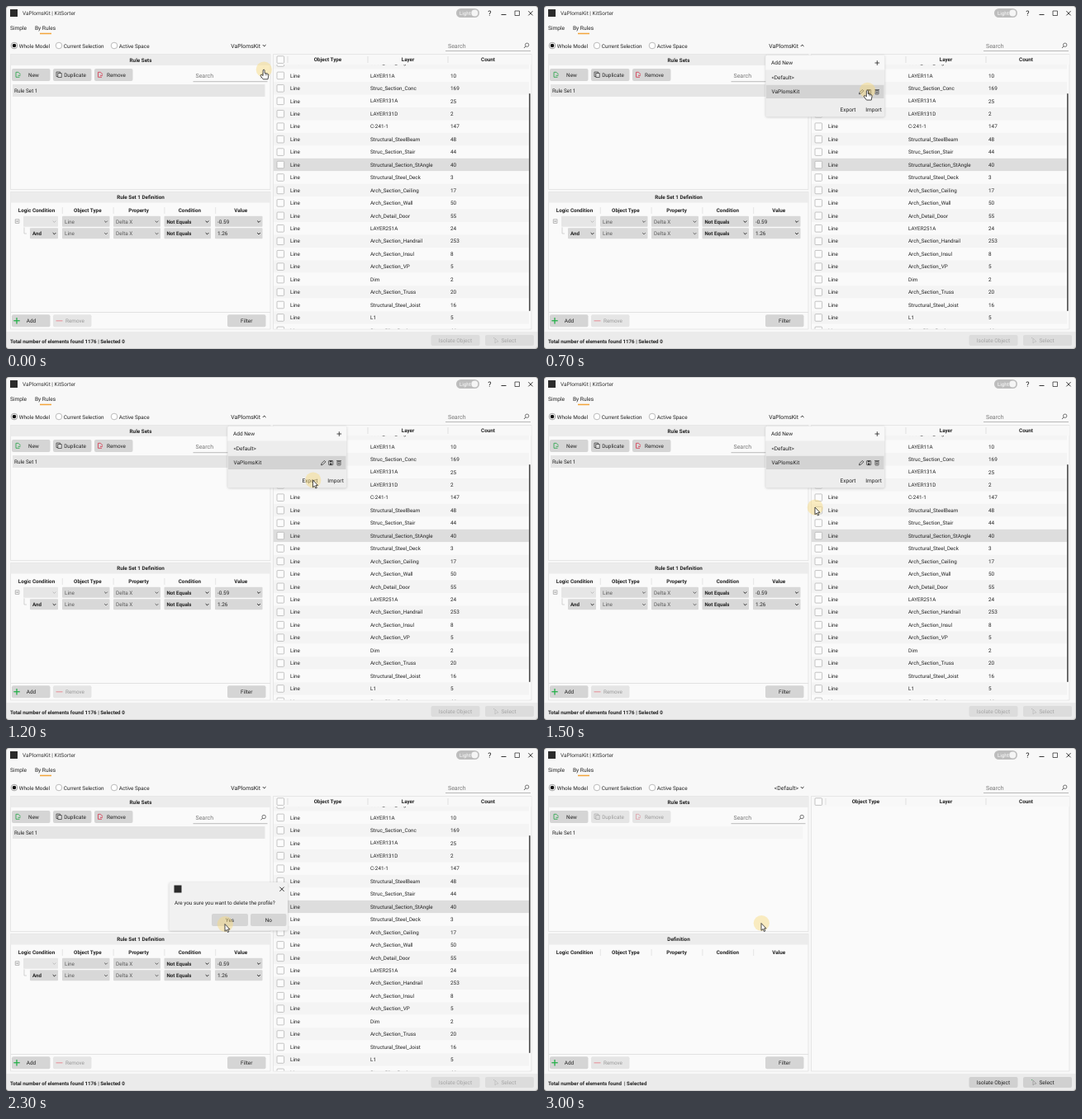
These frames come from a looping animation (644 by 416 pixels, 4.2 s). An HTML page with a canvas:

```html
<!DOCTYPE html>
<html lang="en">
<head>
<meta charset="utf-8">
<title>Rule filter</title>
<style>
html, body { margin: 0; width: 100%; height: 100%; overflow: hidden; background: #f8f8f8; }
canvas { display: block; width: 644px; height: 416px; }
</style>
</head>
<body>
<canvas id="stage"></canvas>
<script>
const W = 644, H = 416, LOOP = 4200, STEP = 100;
const APP = "VaPlomsKit", TOOL = "KitSorter";
const INK = "#222", SOFT = "#5c5c5c", DIM = "#9a9a9a", BTN = "#d5d5d5", BTN_OFF = "#e5e5e5";
const canvas = document.getElementById("stage");
const c = canvas.getContext("2d");
const dpr = window.devicePixelRatio || 1;
canvas.width = W * dpr;
canvas.height = H * dpr;

const layers = [
  ["Struc_Slab_Edge", 12], ["LAYER11A", 10], ["Struc_Section_Conc", 169], ["LAYER131A", 25],
  ["LAYER131D", 2], ["C-241-1", 147], ["Structural_SteelBeam", 48], ["Struc_Section_Stair", 44],
  ["Structural_Section_StAngle", 40], ["Structural_Steel_Deck", 3], ["Arch_Section_Ceiling", 17],
  ["Arch_Section_Wall", 50], ["Arch_Detail_Door", 55], ["LAYER251A", 24],
  ["Arch_Section_Handrail", 253], ["Arch_Section_Insul", 8], ["Arch_Section_VP", 5], ["Dim", 2],
  ["Arch_Section_Truss", 20], ["Structural_Steel_Joist", 16], ["L1", 5], ["Struc_Slim_Deck", 44]
];

// Pointer stops: time, x, y
const path = [
  [0, 312, 77], [200, 311, 49], [300, 311, 49], [400, 345, 73], [500, 382, 102],
  [900, 400.5, 102.5], [1000, 400.5, 103], [1500, 328, 158], [2100, 266, 214],
  [2300, 265, 213.5], [2800, 263, 212.5], [LOOP, 263, 212.5]
];

function pointer(t) {
  let i = 0;
  while (i < path.length - 2 && t >= path[i + 1][0]) i++;
  const [t0, x0, y0] = path[i], [t1, x1, y1] = path[i + 1];
  const k = (t - t0) / (t1 - t0);
  return [x0 + (x1 - x0) * k, y0 + (y1 - y0) * k];
}

function rect(x, y, w, h, fill, r = 0, stroke) {
  c.beginPath();
  c.roundRect(x, y, w, h, r);
  if (fill) { c.fillStyle = fill; c.fill(); }
  if (stroke) { c.strokeStyle = stroke; c.lineWidth = 0.7; c.stroke(); }
}

// y is the visual middle of the text
function text(s, x, y, { size = 6.4, color = INK, bold = false, align = "left" } = {}) {
  c.font = (bold ? "bold " : "") + size + "px Roboto, sans-serif";
  c.fillStyle = color;
  c.textAlign = align;
  c.fillText(s, x, y + size * 0.36);
}

const head = (s, x, y) => text(s, x, y, { size: 6.3, bold: true, align: "center" });

function line(color, width, ...pts) {
  c.beginPath();
  for (let i = 0; i < pts.length; i += 2) c.lineTo(pts[i], pts[i + 1]);
  c.strokeStyle = color;
  c.lineWidth = width;
  c.stroke();
}

function ring(x, y, r, stroke, fill, width = 0.7) {
  c.beginPath();
  c.arc(x, y, r, 0, 7);
  if (fill) { c.fillStyle = fill; c.fill(); }
  if (stroke) { c.strokeStyle = stroke; c.lineWidth = width; c.stroke(); }
}

const chevron = (x, y, up, color = INK) => {
  const d = up ? -0.9 : 0.9;
  line(color, 1, x - 1.8, y - d, x, y + d, x + 1.8, y - d);
};
const cross = (x, y, r) => {
  line(INK, 0.9, x - r, y - r, x + r, y + r);
  line(INK, 0.9, x - r, y + r, x + r, y - r);
};
const plus = (x, y, r, color, w) => {
  line(color, w, x - r, y, x + r, y);
  line(color, w, x, y - r, x, y + r);
};

function button(s, x, y, w, h, on = true, tx = x + w / 2) {
  rect(x, y, w, h, on ? BTN : BTN_OFF, 2);
  text(s, tx, y + h / 2, { align: "center", color: on ? INK : DIM });
}

function search(x, y, x0, x1, base) {
  text("Search", x, y, { size: 7, color: "#777" });
  line("#aaa", 0.8, x0, base, x1, base);
  ring(x1 - 4.3, y - 0.8, 2.2, "#555", null, 0.8);
  line("#555", 0.9, x1 - 5.9, y + 0.8, x1 - 8, y + 3);
}

function docIcon(x, y, color, on) {
  c.globalAlpha = on ? 1 : 0.4;
  line(color, 0.9, x + 2, y + 3, x - 2.5, y + 3, x - 2.5, y - 3, x + 0.5, y - 3, x + 2.5, y - 1, x + 2.5, y);
  line(color, 0.9, x, y + 1, x + 3, y + 1);
  c.globalAlpha = 1;
}

function titleBar(name) {
  rect(5, 4, 9, 9, "#2b2b2b");
  text(APP + " | " + TOOL, 20, 8.7, { size: 6.5, color: "#333" });
  rect(545, 3, 28, 11, "#bdbdbd", 5.5);
  text("Light", 549, 8.6, { size: 6.2, color: "#fff" });
  ring(567.3, 8.5, 4, null, "#f5f5f5");
  text("?", 585.5, 8.7, { size: 9, align: "center" });
  line(INK, 0.9, 599.5, 10.5, 605.5, 10.5);
  rect(616, 6, 5.5, 5.5, null, 0, INK);
  cross(635, 8.8, 2.6);
  text("Simple", 5, 26.5, { size: 6.6 });
  text("By Rules", 35, 26.5, { size: 6.6 });
  rect(41, 32.7, 14, 1.5, "#f2a43a");
  [["Whole Model", 10], ["Current Selection", 64], ["Active Space", 131]].forEach(([s, x], i) => {
    ring(x, 48, 3.8, i ? "#a0a0a0" : "#777", "#fff");
    if (!i) ring(x, 48, 2.3, null, "#111");
    text(s, x + 5.8, 48.2);
  });
  text(name, 308, 48.2, { size: 6.9, align: "right" });
  search(535, 48, 532, 635, 54.5);
}

function combo(s, x, y, w, color = INK, bold = false) {
  rect(x, y, w, 13, "#d8d8d8", 1);
  text(s, x + 3, y + 6.5, { color, bold, size: bold ? 6.2 : 6.4 });
  chevron(x + w - 4.5, y + 6.7, false, color);
}

function ruleSets(empty) {
  rect(5.5, 58.5, 314.5, 164, "#fafafa", 0, "#dedede");
  rect(5.5, 58.5, 314.5, 13.5, "#ececec");
  head("Rule Sets", 163, 65.4);
  button("New", 7, 76, 46.5, 15, true, 33.5);
  button("Duplicate", 57, 76, 46.5, 15, !empty, 83.5);
  button("Remove", 107, 76, 46.5, 15, !empty, 133.5);
  docIcon(14.5, 83.3, "#35a853", true);
  const tone = empty ? "#aaa" : "#333";
  rect(61, 80, 4.5, 5.5, null, 0, tone);
  rect(62.8, 81.5, 4.5, 5, "#ddd", 0, tone);
  docIcon(114, 83.3, "#d6455b", !empty);
  search(229.5, 84.3, 226.5, 316.5, 91.7);
  rect(8, 95, 305.5, 15, empty ? "#f5f5f5" : "#e5e5e5");
  text("Rule Set 1", 10, 102.4);
}

function definition(empty) {
  rect(5.5, 225.5, 314.5, 166.5, "#fafafa", 0, "#dedede");
  rect(5.5, 225.5, 314.5, 13, "#ececec");
  head(empty ? "Definition" : "Rule Set 1 Definition", 163, 232);
  ["Logic Condition", "Object Type", "Property", "Condition", "Value"].forEach((s, i) => {
    head(s, 37 + i * 61.8, 248);
    if (i) line("#e0e0e0", 0.8, 6.5 + i * 61.8, 244, 6.5 + i * 61.8, 252);
  });
  if (!empty) {
    rect(21, 254.8, 42, 13, "#e6e6e6", 1);
    chevron(58.5, 261.5, false, "#bbb");
    combo("And", 29, 269.3, 34, INK, true);
    ["-0.59", "1.26"].forEach((v, i) => {
      const y = 254.8 + i * 14.5;
      combo("Line", 68, y, 57.5, SOFT);
      combo("Delta X", 130, y, 57, SOFT);
      combo("Not Equals", 191.5, y, 56.5, INK, true);
      combo(v, 253, y, 57.5);
    });
    rect(11.3, 258.8, 4.6, 4.6, "#fff", 0, "#999");
    line("#555", 0.7, 12.3, 261.1, 14.9, 261.1);
    line("#bbb", 0.6, 22, 268.5, 22, 276, 25, 276);
  }
  line("#dcdcdc", 0.8, 6, 371.5, 320, 371.5);
  button("Add", 7, 374.3, 46.5, 15, true, 30.5);
  plus(13, 381.7, 3.7, "#27b04b", 1.3);
  button("Remove", 57, 374.3, 46.5, 15, false, 83.5);
  line("#e79aa2", 1.2, 60.5, 381.8, 68.5, 381.8);
  button("Filter", 268, 374.3, 46.5, 15);
}

const checkbox = y => rect(328, y - 4.2, 8.6, 8.6, "#fcfcfc", 1, "#adadad");

function table(empty) {
  rect(323.5, 58.5, 312.5, 333.5, "#fafafa", 0, "#dedede");
  if (!empty) {
    c.save();
    c.beginPath();
    c.rect(324, 70.5, 312, 321);
    c.clip();
    layers.forEach(([name, count], i) => {
      const y = 68.85 + i * 15.45;
      const picked = i === 8;
      rect(324, y - 7.7, 309, 15.45, picked ? "#dddddd" : i % 2 ? "#fafafa" : "#f4f4f4");
      checkbox(y);
      text("Line", 344, y);
      text(name, 441, y, { size: 6.3 });
      text(count, 538, y);
    });
    c.restore();
    rect(633, 106, 1.7, 264, "#555", 0.8);
  }
  rect(324, 59, 312, 12, "#f8f8f8");
  checkbox(65);
  [["Object Type", 389.5], ["Layer", 486.5], ["Count", 583.5]].forEach(([s, x]) => {
    head(s, x, 65);
    line("#dadada", 0.8, x - 48.5, 61, x - 48.5, 69);
  });
}

function footer(empty) {
  rect(0, 395, W, 21, "#ebebeb");
  text("Total number of elements found " + (empty ? " | Selected" : "1176 | Selected 0"), 5, 406.6,
    { size: 6.2, bold: true });
  [["Isolate Object", 514.5, 544], ["Select", 580, 608.5]].forEach(([s, x, tx]) => {
    rect(x, 399, 59, 13, empty ? "#d0d0d0" : "#dcdcdc", 2);
    text(s, tx, 405.6, { size: 6.6, align: "center", color: empty ? INK : "#a5a5a5" });
  });
  const tone = empty ? "#888" : "#b5b5b5";
  line(tone, 0.6, 592, 403, 592, 409, 593.6, 407.4, 596, 407, 592, 403);
  line(empty ? "#35a853" : tone, 0.8, 590, 402.5, 591.2, 402.5);
}

function shadowBox(x, y, w, h, fill) {
  c.save();
  c.shadowColor = "rgba(0,0,0,.2)";
  c.shadowBlur = 3 * dpr;
  c.shadowOffsetY = 0.5 * dpr;
  rect(x, y, w, h, fill, 2);
  c.restore();
}

function menu(hover) {
  shadowBox(268.3, 59.7, 144, 74.8, "#ededed");
  rect(268.3, 59.7, 144, 17.8, "#f8f8f8", [2, 2, 0, 0]);
  text("Add New", 275, 69, { size: 6.5 });
  plus(403.3, 69, 2.8, INK, 0.8);
  text("<Default>", 275.5, 86.6, { size: 6.5 });
  if (hover) rect(269, 95.7, 142.5, 16.3, "#d3d3d3");
  text(APP, 275.5, 104, { size: 6.5 });
  line("#333", 0.8, 381.5, 106.8, 382, 104.8, 385.4, 101.4, 386.9, 102.9, 383.5, 106.3, 381.5, 106.8);
  rect(390.6, 101.5, 5.2, 5.2, null, 0.5, "#333");
  rect(391.8, 101.5, 2.8, 1.8, "#333");
  rect(392, 104.5, 2.4, 2.2, "#333");
  rect(401, 102.4, 4, 4.6, null, 0.5, "#333");
  line("#333", 0.8, 400, 101.7, 406, 101.7);
  line("#333", 0.6, 402.4, 103.5, 402.4, 106);
  line("#333", 0.6, 403.7, 103.5, 403.7, 106);
  text("Export", 368, 125.6, { size: 6.6, align: "center" });
  text("Import", 399, 125.6, { size: 6.6, align: "center" });
}

function dialog(pressed) {
  shadowBox(197.5, 163, 143.5, 58.5, "#f1f1f1");
  rect(203.5, 166.5, 9, 9, "#2b2b2b");
  cross(334, 171.2, 2.6);
  text("Are you sure you want to delete the profile?", 204, 188);
  button("Yes", 249, 201, 44, 15);
  if (pressed) rect(249, 201, 44, 15, "rgba(0,0,0,.05)", 2);
  button("No", 296, 201, 43.5, 15);
}

function windowEdge() {
  c.beginPath();
  c.rect(0, 0, W, H);
  c.roundRect(0, 0, W, H, 4);
  c.fillStyle = "#444";
  c.fill("evenodd");
  rect(0.3, 0.3, W - 0.6, H - 0.6, null, 4, "#b8b8b8");
}

function drawPointer(t) {
  const [x, y] = pointer(t);
  ring(x + 0.3, y, 9.6, null, "rgba(248,218,125,.46)");
  c.save();
  c.translate(x, y);
  const hand = t < 1100;
  const shape = hand
    ? "M-.9 .8Q0-.8 1.1 .8V4.3L4.8 5.2Q6 5.6 5.8 7.2L5 11.8H-.8L-3.8 7.8Q-4.3 6.2-2.6 6.4L-.9 7.6Z"
    : "M0 0V8.8L2 7L3.4 10L4.8 9.4L3.4 6.4H6Z";
  const p = new Path2D(shape);
  c.fillStyle = "#fff";
  c.fill(p);
  c.strokeStyle = "#222";
  c.lineWidth = 0.8;
  c.lineJoin = "round";
  c.stroke(p);
  if (hand) {
    line("#222", 0.5, 2.4, 5, 2.4, 7.2);
    line("#222", 0.5, 4, 5.4, 4, 7.4);
  }
  c.restore();
}

function draw(t) {
  const cleared = t >= 2900, emptyTable = t >= 3000;
  c.setTransform(dpr, 0, 0, dpr, 0, 0);
  c.textRendering = "geometricPrecision";
  rect(0, 0, W, H, "#f8f8f8");
  titleBar(cleared ? "<Default>" : APP);
  chevron(312.7, 48, t >= 400 && t < 2200);
  ruleSets(cleared);
  definition(cleared);
  table(emptyTable);
  footer(emptyTable);
  if (t >= 400 && t < 2100) menu(t >= 600);
  if (t >= 1900 && t < 2800) dialog(t >= 2400);
  windowEdge();
  drawPointer(t);
}

const start = performance.now();
function frame() {
  const t = (performance.now() - start) % LOOP;
  draw(Math.floor(t / STEP) * STEP);
  requestAnimationFrame(frame);
}
frame();
</script>
</body>
</html>
```
